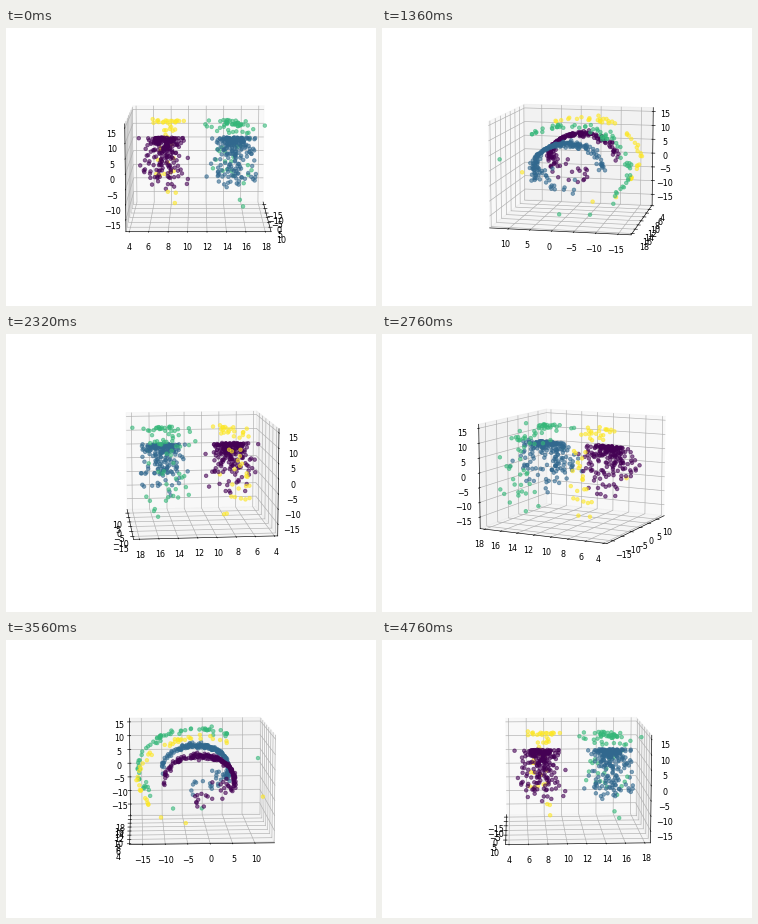
Animation, 370 px wide and 278 px high, one loop 4800 ms. Source, as a matplotlib script:

```python
import numpy as np
import matplotlib.pyplot as plt
from matplotlib.animation import FuncAnimation

WIDTH, HEIGHT, DPI = 370, 278, 57.8125
FRAMES, INTERVAL = 120, 40
ELEVATION, STEP = 10, 3

rng = np.random.default_rng(8)


def ring(radius, angles, noise, y_mean, y_spread):
    """Points around a circle in the x-z plane, spread along y."""
    t = np.radians(angles)
    r = radius + rng.normal(0, noise, t.size)
    y = rng.normal(y_mean, y_spread, t.size)
    return np.column_stack([r * np.cos(t) - 2, y, r * np.sin(t)])


def inner(y_mean):
    """Dense arch that thins out towards its left foot, with a loose tail."""
    arch = np.concatenate([rng.normal(62, 42, 150).clip(-25, 175), rng.uniform(-25, 190, 45)])
    tail = rng.uniform(-100, 0, 22)
    return np.vstack([
        ring(8, arch, 0.13, y_mean, 1.0),
        ring(6.5, tail, 1.3, y_mean, 1.4),
    ])


def outer(y_mean, y_spread, top, side, strays):
    """Sparse wide arch plus a few strays further round the circle."""
    arch = np.concatenate([rng.uniform(55, 125, top), rng.uniform(125, 215, side)])
    return np.vstack([
        ring(13.9, arch, 0.2, y_mean, y_spread),
        ring(15.7, np.array(strays), 0.3, y_mean + 0.6, 0.6),
    ])


groups = [
    inner(7.4),
    inner(15.0),
    outer(15.1, 1.1, 30, 36, [10, 224, 250, 276]),
    outer(7.5, 0.8, 22, 20, [-23, 237, 259]),
]
points = np.vstack(groups)
labels = np.repeat(np.arange(4), [len(g) for g in groups])

fig = plt.figure(figsize=(WIDTH / DPI, HEIGHT / DPI), dpi=DPI)
ax = fig.add_subplot(projection="3d")
ax.scatter(*points.T, c=labels, cmap="viridis", s=20, alpha=0.6, depthshade=False)
ax.set(xlim=(-17.9, 14.4), ylim=(3.65, 18.6), zlim=(-18.95, 16.35),
       xticks=range(-15, 11, 5), yticks=range(4, 19, 2), zticks=range(-15, 16, 5))


def draw(i):
    # The small offset settles which wall is hidden in head-on views.
    ax.view_init(elev=ELEVATION, azim=STEP * i + 0.01)
    return ()


anim = FuncAnimation(fig, draw, frames=FRAMES, interval=INTERVAL, repeat=True, repeat_delay=0)
plt.show()
```
